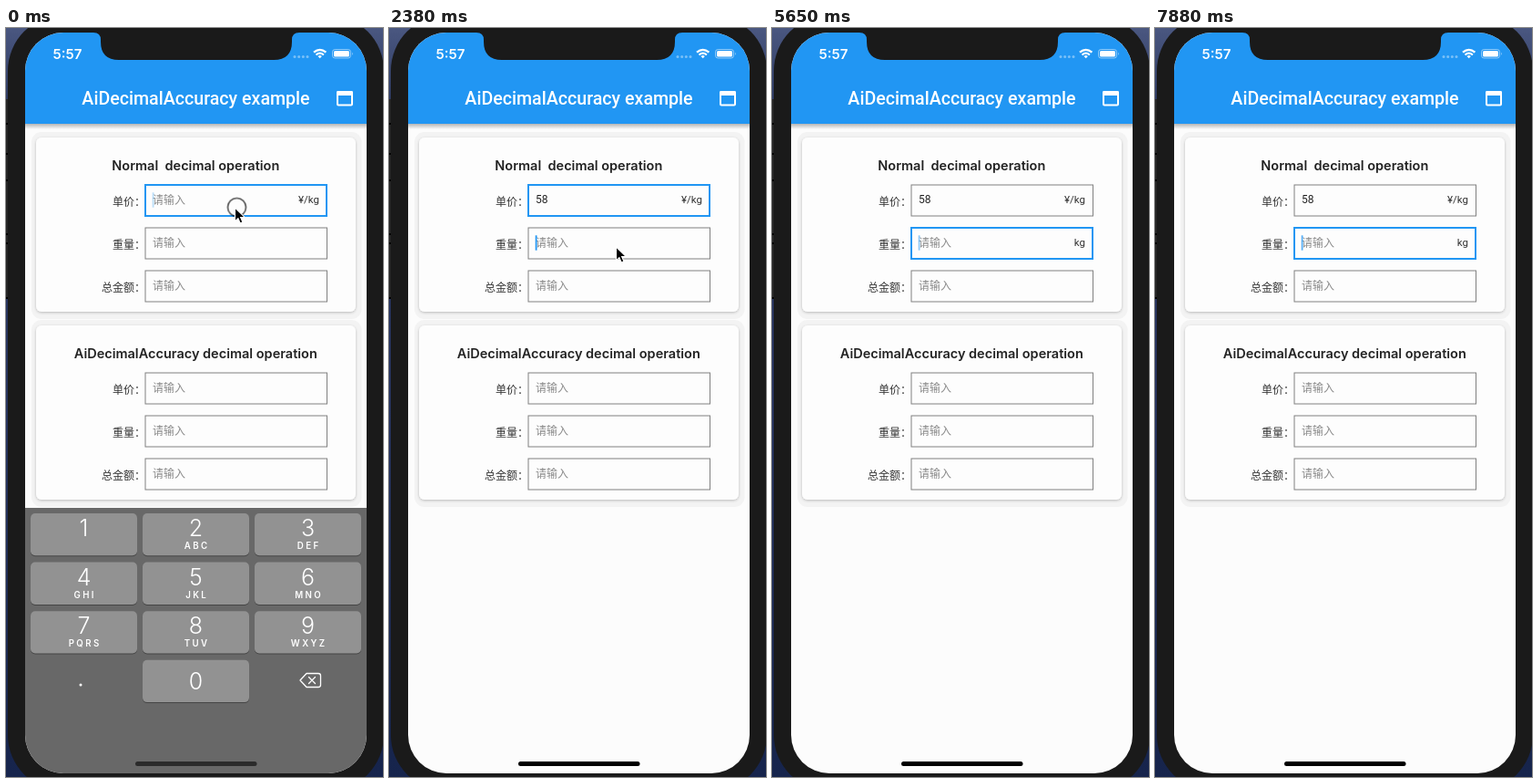
An HTML page that plays this animation: 414x821 px, repeating every 8 s.

```html
<!DOCTYPE html>
<html lang="zh-CN">
<head>
<meta charset="utf-8">
<title>AiDecimalAccuracy example</title>
<style>
  html, body { margin: 0; width: 100%; height: 100%; overflow: hidden; background: #1a1a1a; }
  svg { display: block; width: 414px; height: 821px; }
  text { white-space: pre; }
  .cjk { font: 12px "Noto Sans CJK SC", "Noto Sans CJK", sans-serif; }
  .label { fill: #333; }
  .hint { fill: #8a8a8a; }
  .value { font: 12px Roboto, sans-serif; fill: #222; }
  .unit { font: 11.5px Roboto, sans-serif; fill: #333; text-anchor: end; }
  .heading { font: 600 14.5px Inter, sans-serif; fill: #222; text-anchor: middle; }
  .title { font: 500 19.6px Roboto, sans-serif; fill: #fff; text-anchor: middle; }
  .clock { font: 600 15px Inter, sans-serif; fill: #fff; }
  .digit { font: 300 25px Inter, sans-serif; fill: #fff; text-anchor: middle; }
  .letters { font: 600 9.7px Inter, sans-serif; fill: #fff; letter-spacing: 2.4px; text-anchor: middle; }
  .box { fill: none; stroke: #808080; }
  .focus { fill: none; stroke: #2196f3; stroke-width: 2; }
  .caret { fill: #2196f3; }

  .anim { animation: 8s step-end infinite; }
  #keyboard { animation-name: keyboard; }
  #homebar { animation-name: homebar; }
  #hintPrice { animation-name: hint-price; }
  #five { animation-name: five; }
  #fiftyEight { animation-name: fifty-eight; }
  #focusPrice { animation-name: focus-price; }
  #focusWeight { animation-name: focus-weight; }
  #unitWeight { animation-name: unit-weight; }
  #caretPrice { animation-name: caret-price; }
  #caretWeight { animation-name: caret-weight; }
  #pointer { animation-name: pointer; }
  #tap { animation-name: tap; }

  @keyframes keyboard { 0% { opacity: 1 } 13% { opacity: 0 } }
  @keyframes homebar { 0% { fill: #2b2b2b } 13% { fill: #000 } }
  @keyframes hint-price { 0% { opacity: 1 } 13% { opacity: .85 } 14.875% { opacity: .25 } 16.75% { opacity: 0 } }
  @keyframes five { 0% { opacity: 0 } 13% { opacity: 1 } 14.875% { opacity: 0 } }
  @keyframes fifty-eight { 0% { opacity: 0 } 14.875% { opacity: 1 } }
  @keyframes focus-price { 0% { opacity: 1 } 31.625% { opacity: 0 } }
  @keyframes focus-weight { 0% { opacity: 0 } 31.625% { opacity: 1 } }
  @keyframes unit-weight { 0% { opacity: 0 } 31.625% { opacity: .6 } 33.5% { opacity: 1 } }
  @keyframes caret-price {
    0% { opacity: .3; transform: none }
    1.875% { opacity: 1; transform: none }
    5.625% { opacity: .5; transform: none }
    7.5% { opacity: 0; transform: none }
    11.125% { opacity: .55; transform: none }
    13% { opacity: 1; transform: translateX(6.7px) }
    14.875% { opacity: 1; transform: translateX(13.5px) }
    22.375% { opacity: .5; transform: translateX(13.5px) }
    24.25% { opacity: 0; transform: translateX(13.5px) }
  }
  @keyframes caret-weight {
    0%, 40.875%, 52.125%, 65.25%, 78.125%, 91.125% { opacity: 0 }
    29.75%, 46.5%, 59.625%, 72.5%, 83.75%, 96.625% { opacity: 1 }
    39%, 44.625%, 50.25%, 57.75%, 63.375%, 70.625%, 76.25%, 87.375%, 94.75% { opacity: .5 }
    81.875% { opacity: .4 }
    89.25% { opacity: .1 }
    98.5% { opacity: .75 }
  }
  @keyframes pointer {
    0% { opacity: 1; transform: translate(251px, 197px) }
    24.25% { opacity: 1; transform: translate(250px, 224px) }
    26.125% { opacity: 1; transform: translate(249px, 248px) }
    27.875% { opacity: 1; transform: translate(249px, 240px) }
    52.125% { opacity: 0; transform: translate(249px, 240px) }
  }
  @keyframes tap {
    0% { opacity: 1; transform: translate(253.5px, 196.5px) }
    1.875% { opacity: 0; transform: translate(251.5px, 239.5px) }
    27.875% { opacity: 1; transform: translate(251.5px, 239.5px) }
    29.75% { opacity: 0; transform: translate(251.5px, 239.5px) }
  }
</style>
</head>
<body>
<svg viewBox="0 0 414 821" xmlns="http://www.w3.org/2000/svg">
  <defs>
    <linearGradient id="desktop" x2="0" y2="1">
      <stop offset="0" stop-color="#4a5780"/>
      <stop offset=".12" stop-color="#26335c"/>
      <stop offset=".5" stop-color="#27345f"/>
      <stop offset="1" stop-color="#16244c"/>
    </linearGradient>
    <linearGradient id="barShadow" x2="0" y2="1">
      <stop offset="0" stop-color="#000" stop-opacity=".28"/>
      <stop offset="1" stop-color="#000" stop-opacity="0"/>
    </linearGradient>
    <clipPath id="screen"><rect x="21" y="5" width="375" height="812" rx="42"/></clipPath>
    <filter id="lift" x="-5%" y="-5%" width="110%" height="112%">
      <feDropShadow dx="0" dy="1" stdDeviation="1.6" flood-opacity=".24"/>
    </filter>
  </defs>

  <rect width="414" height="821" fill="url(#desktop)"/>
  <path d="M0 78h3v218h-3z" fill="#262626"/>
  <path d="M0 105h3M0 138h3M0 167h3M0 226h3M0 236h3M0 296h3" stroke="#000" stroke-width="2"/>
  <rect x="2" y="-14" width="413" height="850" rx="61" fill="#1a1a1a"/>

  <g clip-path="url(#screen)">
    <rect x="21" y="5" width="375" height="812" fill="#fcfcfc"/>
    <rect x="21" y="105" width="375" height="6" fill="url(#barShadow)"/>
    <rect x="21" y="5" width="375" height="100" fill="#2196f3"/>
    <g id="cards"></g>
    <g id="keyboard" class="anim">
      <rect x="21" y="526" width="375" height="291" fill="#686868"/>
      <g id="keys"></g>
      <circle cx="82" cy="720" r="1.5" fill="#fff"/>
      <path d="M330 707.5h13q2.500 0 2.500 2.500v10q0 2.500-2.500 2.500h-13l-7-7.500zM332.500 711.500l7 7m0-7l-7 7"
            fill="none" stroke="#fff" stroke-width="1.3" stroke-linejoin="round" stroke-linecap="round"/>
    </g>
    <rect id="homebar" class="anim" x="142" y="804" width="133.500" height="5" rx="2.500"/>
  </g>
  <path d="M96 4v1q8 0 8 8v2q0 20 20 20h170q20 0 20-20v-2q0-8 8-8v-1z" fill="#1a1a1a"/>

  <text class="clock" x="51.500" y="33.500">5:57</text>
  <g fill="#fff" fill-opacity=".4">
    <circle cx="317" cy="31.500" r="1.500"/><circle cx="321.700" cy="31.500" r="1.500"/>
    <circle cx="326.300" cy="31.500" r="1.500"/><circle cx="331" cy="31.500" r="1.500"/>
  </g>
  <g fill="none" stroke="#fff" stroke-width="2.200">
    <path d="M338 26.700q6.700-5.800 13.400 0M340.500 29.500q4.200-3.600 8.400 0"/>
    <path d="M344.700 33.200l-2.200-2.300q2.200-1.700 4.400 0z" fill="#fff" stroke="none"/>
  </g>
  <rect x="358.500" y="23.500" width="20" height="9.500" rx="2.800" fill="none" stroke="#fff" stroke-opacity=".5"/>
  <rect x="360" y="25" width="17" height="6.500" rx="1.500" fill="#fff"/>
  <path d="M380 26.500q1.600 1.700 0 3.500z" fill="#fff" fill-opacity=".6"/>

  <text class="title" x="208.500" y="84">AiDecimalAccuracy example</text>
  <rect x="364" y="70" width="16" height="14.500" rx="1" fill="none" stroke="#fff" stroke-width="2"/>
  <rect x="363" y="69" width="18" height="5" rx="1.500" fill="#fff"/>

  <circle id="tap" class="anim" r="10" fill="none" stroke="#000" stroke-width="1.100"/>
  <path id="pointer" class="anim" d="M.5 0v14.800l3.400-3.200 2.300 5.300 2.700-1.100-2.300-5.200h4.800z"
        stroke="#fff" stroke-width="1.100"/>
</svg>
<script>
  const labels = ['单价：', '重量：', '总金额：'];

  const field = (label, row, top, extra = '', hint = '') => {
    const y = top + row * 47;
    return `<text class="cjk label" x="${153 - 12 * label.length}" y="${y + 22.6}">${label}</text>
      <rect class="box" x="153" y="${y}" width="199.5" height="34"/>
      <text class="cjk hint" ${hint} x="161" y="${y + 20.6}">请输入</text>${extra}`;
  };

  const focus = (name, y) =>
    `<rect id="focus${name}" class="focus anim" x="153" y="${y}" width="199" height="34"/>
     <rect id="caret${name}" class="caret anim" x="160.7" y="${y + 8.3}" width="1.8" height="16.4"/>`;

  const extras = [
    `<text id="five" class="value anim" x="161" y="192">5</text>
     <text id="fiftyEight" class="value anim" x="161" y="192">58</text>
     <text class="unit" x="344" y="191.7">¥/kg</text>` + focus('Price', 172),
    '<text id="unitWeight" class="unit anim" x="344" y="238.7">kg</text>' + focus('Weight', 219)
  ];

  const card = (heading, y, live) => `
    <rect x="28" y="${y - 6}" width="362.5" height="205" rx="11" fill="#f3f3f3"/>
    <rect x="33" y="${y}" width="351" height="191" rx="6" fill="#fdfdfd" filter="url(#lift)"/>
    <text class="heading" x="208.3" y="${y + 36}">${heading}</text>` +
    labels.map((label, row) => field(label, row, y + 52, live ? extras[row] : '',
      live && row === 0 ? 'id="hintPrice" style="animation:hint-price 8s step-end infinite"' : '')).join('');

  document.getElementById('cards').innerHTML =
    card('Normal  decimal operation', 120, true) +
    card('AiDecimalAccuracy decimal operation', 326, false);

  const key = (digit, letters, col, row) => {
    const x = 27 + col * 123, y = 532 + row * 53.6, mid = x + 58.5;
    const digitY = y + (digit === '0' ? 32 : 25);
    return `<rect x="${x}" y="${y + 1}" width="117" height="46.3" rx="5" fill="#454545"/>
      <rect x="${x}" y="${y}" width="117" height="46.3" rx="5" fill="#929292"/>
      <text class="digit" x="${mid}" y="${digitY}">${digit}</text>
      <text class="letters" x="${mid + 1.2}" y="${y + 39}">${letters}</text>`;
  };

  document.getElementById('keys').innerHTML =
    ['', 'ABC', 'DEF', 'GHI', 'JKL', 'MNO', 'PQRS', 'TUV', 'WXYZ']
      .map((letters, i) => key(String(i + 1), letters, i % 3, Math.floor(i / 3))).join('') +
    key('0', '', 1, 3);
</script>
</body>
</html>
```
